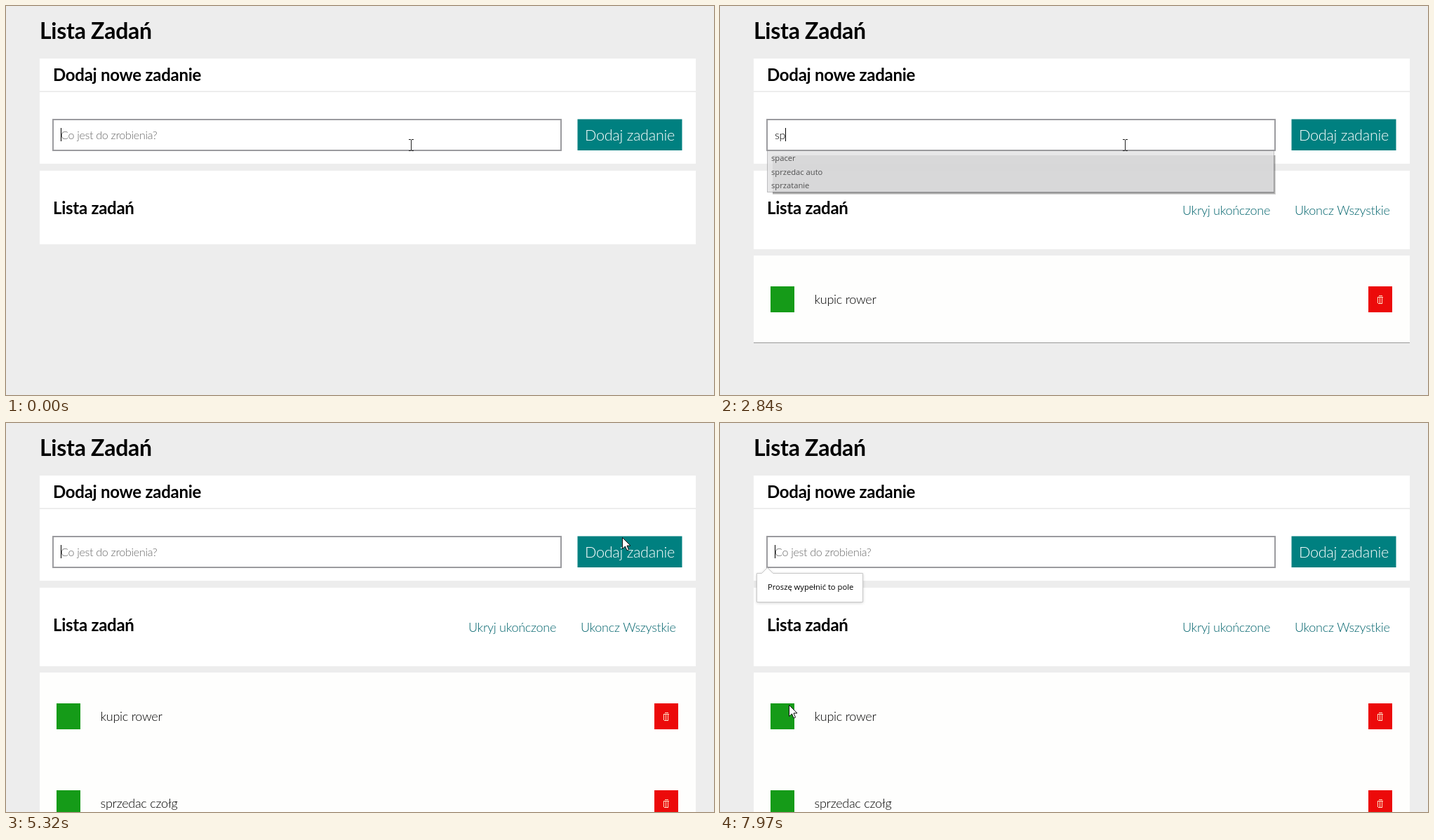
An HTML page with a canvas that plays this animation: 1009x555 px, repeating every 8000 ms.

```html
<!DOCTYPE html>
<html lang="pl">
<head>
<meta charset="utf-8">
<title>Lista Zadań</title>
<style>
  html, body { margin: 0; width: 100%; height: 100%; overflow: hidden; background: #ededed; }
  canvas { display: block; }
</style>
</head>
<body>
<canvas id="stage" width="1009" height="555"></canvas>
<script>
const ctx = document.getElementById('stage').getContext('2d');
const LOOP = 8000, BLINK = 530, TIP_OPEN = 5600;
const GREY = '#ededed';
const bold = size => `700 ${size}px Lato, sans-serif`;
const light = size => `300 ${size}px Lato, sans-serif`;
const MENU_FONT = '11.2px "Open Sans", sans-serif';

// letters appear from start to last at a pace bent by the exponent, enter adds the task
const tasks = [
  { name: 'kupic rower', start: 1170, last: 2400, enter: 2530, pace: 1.4 },
  { name: 'sprzedac czołg', start: 2740, last: 4450, enter: 4610, pace: 0.8 }
];
const history = ['kupa', 'kupic chleb', 'spacer', 'sprzedac auto', 'sprzatanie', 'sklep'];
const MENU_OPEN = 30;
const caretResets = [-60, 4180, TIP_OPEN];

// pointer strokes: curves from the last resting place
const REST = [577, 198];
const moves = [
  { from: 5000, to: 5320, bend: [652, -116], end: [878, 163] },
  { from: 5320, to: 5350, bend: [920, 173], end: [958, 183] },
  { from: 5550, to: 6340, bend: [400, 520], end: [200, 465] },
  { from: 6370, to: 6800, bend: [140, 450], end: [91, 439] },
  { from: 6960, to: 7140, bend: [120, 300], end: [203, 258] },
  { from: 7160, to: 7310, bend: [300, 130], end: [414, 60] },
  { from: 7480, to: 7960, bend: [60, 440], end: [98, 402] }
];

const clamp = v => Math.max(0, Math.min(1, v));
const ease = k => k * k * (3 - 2 * k);

function rect(x, y, w, h, color) {
  ctx.fillStyle = color;
  ctx.fillRect(x, y, w, h);
}

function text(str, x, y, font, color, align = 'left') {
  ctx.font = font;
  ctx.letterSpacing = font === MENU_FONT ? '0px' : '-0.27px';
  ctx.fillStyle = color;
  ctx.textAlign = align;
  ctx.fillText(str, x, y);
}

function poly(points, fill, stroke) {
  ctx.beginPath();
  points.forEach(([x, y]) => ctx.lineTo(x, y));
  ctx.closePath();
  ctx.fillStyle = fill;
  ctx.fill();
  if (stroke) {
    ctx.strokeStyle = stroke;
    ctx.lineWidth = 1;
    ctx.stroke();
  }
}

function typedAt(t) {
  const task = tasks.find(({ start, enter }) => t >= start && t < enter);
  if (!task) return '';
  const { name, start, last, pace } = task;
  const share = clamp((t - start) / (last - start)) ** pace;
  return name.slice(0, 1 + Math.floor(share * (name.length - 1)));
}

function caretShown(t) {
  if (t >= tasks[0].start && t < tasks[1].enter) return true;
  const reset = caretResets.filter(r => r <= t).pop();
  return (t - reset) % (2 * BLINK) < BLINK;
}

function pointerAt(t) {
  let pos = REST;
  for (const { from, to, bend, end } of moves) {
    if (t < from) break;
    const k = ease(clamp((t - from) / (to - from)));
    pos = pos.map((a, i) => (1 - k) ** 2 * a + 2 * k * (1 - k) * bend[i] + k * k * end[i]);
  }
  return pos.map(Math.round);
}

function drawForm(t) {
  rect(48, 75, 935, 150, '#fff');
  rect(48, 121, 935, 2, GREY);
  text('Dodaj nowe zadanie', 67, 107, bold(24), '#000');

  ctx.strokeStyle = '#9b9b9f';
  ctx.lineWidth = 2;
  ctx.strokeRect(67, 162, 724, 44);

  const typed = typedAt(t);
  text(typed || 'Co jest do zrobienia?', 78, 190, light(16), typed ? '#000' : '#666');
  if (caretShown(t)) rect(78 + Math.round(ctx.measureText(typed).width), 174, 1, 19, '#000');

  rect(814.5, 161.5, 149, 44.5, '#008080');
  text('Dodaj zadanie', 889, 192, light(21.6), '#fff', 'center');
}

function drawTask(name, y, back) {
  rect(48, y, 935, 124, back);
  rect(48, y + 124, 935, 1, '#989898');
  rect(72, y + 44, 34, 37, '#159b18');
  text(name, 134.5, y + 69, light(18), '#000');
  rect(924, y + 44, 34, 37, '#ec0a0a');
  // bin
  const cream = '#ffe2c8';
  rect(937, y + 59, 8, 1, cream);
  rect(939, y + 57, 5, 1, cream);
  for (let x = 937; x < 945; x += 3) rect(x, y + 60, 1, 8, cream);
  rect(938, y + 68, 6, 1, cream);
}

function drawList(t) {
  const added = tasks.filter(task => t >= task.enter);
  rect(48, 235, 935, added.length ? 112 : 105, '#fff');
  text('Lista zadań', 67, 297, bold(24), '#000');
  if (!added.length) return;
  text('Ukryj ukończone', 659, 298, light(18), '#00636c');
  text('Ukoncz Wszystkie', 819, 298, light(18), '#00636c');
  added.forEach((task, i) => drawTask(task.name, 356 + i * 125 - i, '#fefefd'));
}

function drawMenu(t) {
  const typed = typedAt(t);
  const fresh = t >= MENU_OPEN && t < tasks[0].start;
  if (!typed && !fresh) return;
  const rows = history.filter(entry => entry.startsWith(typed));
  if (!rows.length) return;

  const opened = t < tasks[1].start ? MENU_OPEN : tasks[1].start;
  ctx.globalAlpha = clamp((t - opened) / 160);
  const h = Math.round(rows.length * 19.5) + 1;
  for (let i = 1; i <= 3; i++) rect(75, 213, 714 + i, h - 7 + i, 'rgba(0,0,0,.26)');
  rect(67, 206, 723, h, '#98989c');
  rect(68, 207, 721, h - 2, '#fff');
  rows.forEach((row, i) => text(row, 73, Math.round(221 + i * 19.5), MENU_FONT, '#000'));
  ctx.globalAlpha = 1;
}

function drawTip(t) {
  if (t < TIP_OPEN) return;
  const [left, right, top, bottom, tipX] = [52.5, 203.5, 214.5, 255.5, 67.5];
  const outline = [[left, top], [tipX - 8, top], [tipX, top - 8], [tipX + 8, top],
    [right, top], [right, bottom], [left, bottom]];
  ctx.globalAlpha = clamp((t - TIP_OPEN) / 120);
  ctx.shadowColor = 'rgba(0,0,0,.22)';
  ctx.shadowBlur = 4;
  ctx.shadowOffsetY = 1;
  poly(outline, '#fff');
  ctx.shadowColor = 'transparent';
  poly(outline, '#fff', '#c8c8c8');
  text('Proszę wypełnić to pole', 68, 238, MENU_FONT, '#000');
  ctx.globalAlpha = 1;
}

function drawPointer(t) {
  const [x, y] = pointerAt(t);
  if (x > 67 && x < 791 && y > 161 && y < 206) {
    rect(x, y - 7, 1, 15, '#222');
    for (const dy of [-8, 8]) {
      rect(x - 3, y + dy, 3, 1, '#222');
      rect(x + 1, y + dy, 3, 1, '#222');
    }
    return;
  }
  const shape = [[0, 0], [0, 16], [4, 12.5], [6.5, 18.5], [9, 17.5], [6.5, 11.5], [11.5, 11.5]];
  poly(shape.map(([dx, dy]) => [x + .5 + dx, y + .5 + dy]), '#fff', '#111');
}

function draw(t) {
  rect(0, 0, 1009, 555, GREY);
  text('Lista Zadań', 48, 47, bold(32), '#000');
  drawForm(t);
  drawList(t);
  drawMenu(t);
  drawTip(t);
  drawPointer(t);
}

function frame() {
  draw(performance.now() % LOOP);
  requestAnimationFrame(frame);
}
frame();
</script>
</body>
</html>
```
